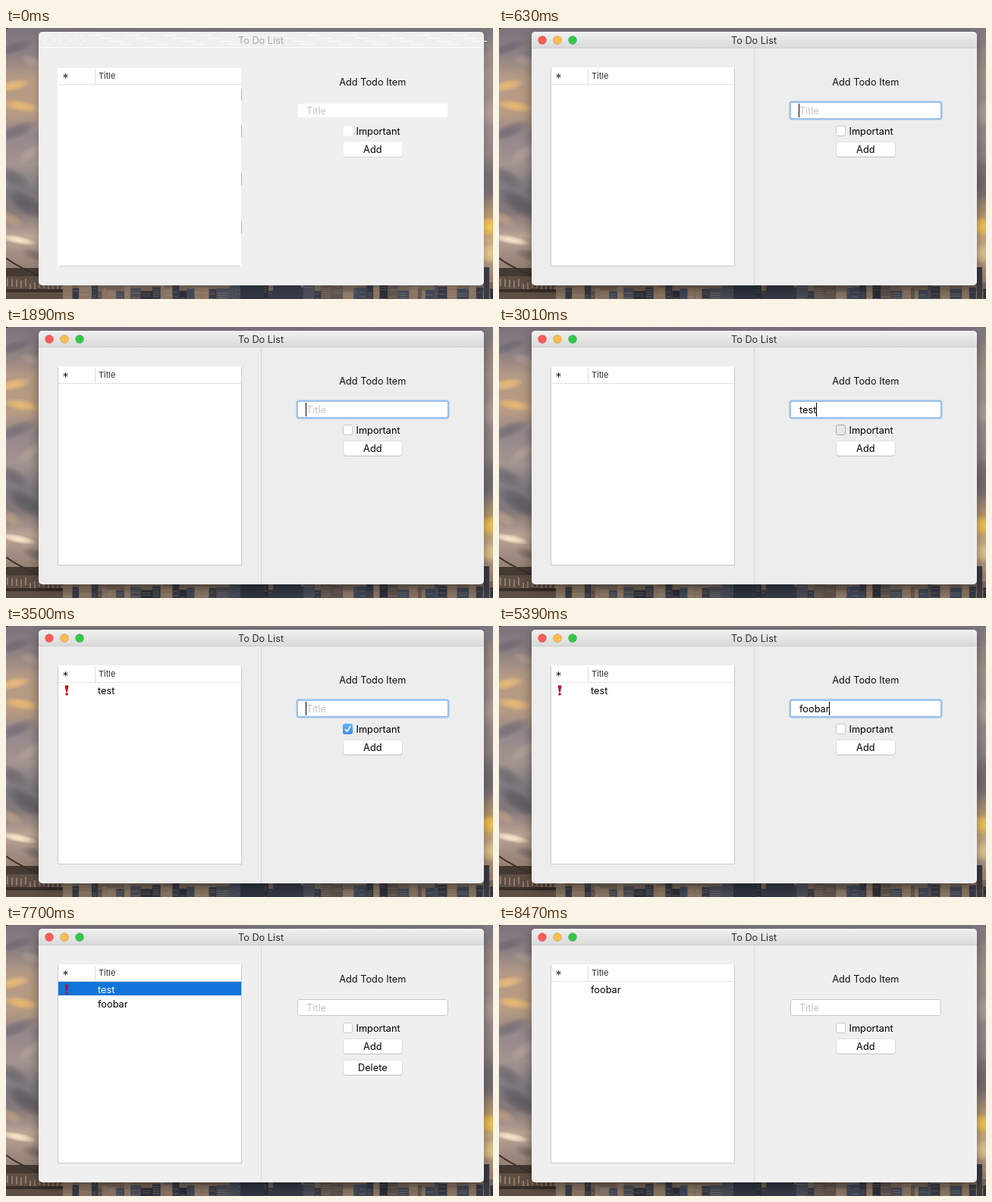
Recreate the animation shown at these times as an HTML page with a canvas. Size 642 by 358 pixels, loop 8.54 s.

```html
<!DOCTYPE html>
<html lang="en">
<head>
<meta charset="utf-8">
<title>To Do List</title>
<style>
html, body { margin: 0; width: 100%; height: 100%; overflow: hidden; background: #6b6672; }
canvas { display: block; }
</style>
</head>
<body>
<canvas id="stage" width="642" height="358"></canvas>
<script>
const W = 642, H = 358, LOOP = 8540, STEP = 70;
const ctx = document.getElementById('stage').getContext('2d');
const FONT = 'Inter, Roboto, sans-serif';
const SIZE = 12.75;

// Times of the user's actions, in ms
const AT = {
  awake: 70, check: 3080, add1: 3430, uncheck: 4060,
  add2: 5880, select: 6790, remove: 8120
};
const TYPING = [
  { word: 'test', start: 2100, gap: 140, end: AT.add1 },
  { word: 'foobar', start: 4480, gap: 140, end: AT.add2 }
];

const backdrop = makeBackdrop();

function seeded(seed) {
  return () => {
    seed = (seed * 16807) % 2147483647;
    return seed / 2147483647;
  };
}

function makeBackdrop() {
  const cv = document.createElement('canvas');
  cv.width = W;
  cv.height = H;
  const c = cv.getContext('2d');
  const rnd = seeded(77);

  const rect = (color, x, y, w, h) => {
    c.fillStyle = color;
    c.fillRect(x, y, w, h);
  };
  const sky = (x, w, stops) => {
    const g = c.createLinearGradient(0, 0, 0, H);
    for (const [y, color] of stops) g.addColorStop(y / H, color);
    rect(g, x, 0, w, H);
  };
  const cloud = (x, y, rx, ry, tilt, rgb, alpha) => {
    c.save();
    c.translate(x, y);
    c.rotate(tilt);
    c.scale(rx, ry);
    const g = c.createRadialGradient(0, 0, 0, 0, 0, 1);
    g.addColorStop(0, `rgba(${rgb},${alpha})`);
    g.addColorStop(.5, `rgba(${rgb},${alpha * .7})`);
    g.addColorStop(1, `rgba(${rgb},0)`);
    rect(g, -1, -1, 2, 2);
    c.restore();
  };

  sky(0, 320, [[0, '#7b737b'], [35, '#8d8183'], [65, '#b49a86'], [112, '#b89b82'],
    [140, '#94878a'], [180, '#a39490'], [215, '#7c787e'], [245, '#85797a'],
    [275, '#bba595'], [300, '#a08c80'], [330, '#8c7868']]);
  sky(320, 322, [[0, '#7c7680'], [60, '#a3938d'], [140, '#968a8b'], [220, '#85797a'],
    [262, '#d0a868'], [290, '#c4aa8e'], [330, '#9a8370']]);

  // Cloud banks, lit from the left
  cloud(12, 26, 26, 8, -.3, '104,99,110', .7);
  cloud(34, 44, 18, 8, .4, '176,158,150', .7);
  cloud(10, 76, 24, 8, -.2, '238,190,120', .9);
  cloud(20, 103, 26, 8, .15, '238,188,112', .9);
  cloud(14, 136, 30, 10, -.4, '112,106,116', .8);
  cloud(32, 166, 22, 9, -.6, '184,166,156', .7);
  cloud(10, 198, 26, 12, .5, '100,98,106', .7);
  cloud(26, 232, 30, 14, .6, '82,82,92', .75);
  cloud(6, 252, 18, 9, .5, '196,164,132', .7);
  cloud(16, 280, 26, 6, .2, '255,236,206', .95);
  cloud(38, 300, 18, 8, .3, '112,100,98', .7);
  cloud(638, 40, 14, 22, 0, '158,140,130', .6);
  cloud(638, 112, 14, 20, 0, '188,170,160', .6);
  cloud(638, 200, 16, 30, 0, '100,96,104', .6);
  cloud(637, 262, 16, 13, 0, '246,200,84', .95);
  cloud(638, 298, 14, 14, 0, '240,208,140', .8);

  // Bridge at the lower left
  rect('#5e4f45', 0, 326, 75, 32);
  rect('#453933', 0, 317, 46, 11);
  for (let x = 1; x < 74; x += 6) rect('#907a68', x, 331 + rnd() * 8, 2, 10);
  rect('#382e2a', 0, 345, 75, 4);
  c.strokeStyle = '#3a302b';
  c.lineWidth = 2;
  c.beginPath();
  c.moveTo(0, 304);
  c.quadraticCurveTo(30, 326, 110, 352);
  c.stroke();

  // Skyline along the lower edge
  rect('#75665a', 75, 336, W - 75, 22);
  const tones = ['#363a45', '#4a4d57', '#2c2f39', '#5f544e', '#8a7563', '#3f4958'];
  for (let x = 75; x < W;) {
    const w = 4 + rnd() * 13;
    const top = 336 + rnd() * 12;
    rect(tones[Math.floor(rnd() * tones.length)], x, top, w, H - top);
    for (let y = top + 3; y < H; y += 3) {
      if (rnd() > .55) rect('rgba(190,158,126,.35)', x + 1, y, w - 3, 1);
    }
    x += w;
  }
  rect('#303541', 309, 334, 31, 24);
  rect('#353a46', 353, 336, 36, 22);
  rect('#3b3b44', 630, 316, 7, 42);
  rect('#1d1b20', 0, 0, 2, 1);
  return cv;
}

function fill(color, x, y, w, h) {
  ctx.fillStyle = color;
  ctx.fillRect(x, y, w, h);
}

function round(x, y, w, h, r, color, line) {
  ctx.beginPath();
  ctx.roundRect(x, y, w, h, r);
  if (color) {
    ctx.fillStyle = color;
    ctx.fill();
  }
  if (line) {
    ctx.strokeStyle = line;
    ctx.lineWidth = 1;
    ctx.stroke();
  }
}

function text(str, x, y, color = '#000', size = SIZE, align = 'left') {
  ctx.font = `${size}px ${FONT}`;
  ctx.textAlign = align;
  ctx.fillStyle = color;
  ctx.fillText(str, x, y);
}

function vertical(y0, y1, from, to) {
  const g = ctx.createLinearGradient(0, y0, 0, y1);
  g.addColorStop(0, from);
  g.addColorStop(1, to);
  return g;
}

function stateAt(t) {
  const s = {
    awake: t >= AT.awake,
    focus: t >= AT.awake && t < AT.select,
    checked: t >= AT.check && t < AT.uncheck,
    boxDown: [AT.check, AT.uncheck].some(e => t >= e - 140 && t < e),
    addDown: [AT.add1, AT.add2].some(e => t >= e - 140 && t < e),
    deleteDown: t >= AT.remove - 140 && t < AT.remove,
    selected: t >= AT.select && t < AT.remove,
    typed: '', lastKey: 400, rows: []
  };
  for (const { word, start, gap, end } of TYPING) {
    if (t >= end) s.lastKey = end;
    else if (t >= start) {
      const n = Math.min(word.length, Math.floor((t - start) / gap) + 1);
      s.typed = word.slice(0, n);
      s.lastKey = start + (n - 1) * gap;
    }
  }
  if (t >= AT.add1 && t < AT.remove) s.rows.push({ title: 'test', urgent: true });
  if (t >= AT.add2) s.rows.push({ title: 'foobar' });
  s.caret = s.focus && (t - s.lastKey) % 1060 < 530;
  return s;
}

function drawWindow(s) {
  ctx.save();
  ctx.shadowColor = `rgba(0,0,0,${s.awake ? .4 : .2})`;
  ctx.shadowBlur = s.awake ? 16 : 8;
  ctx.shadowOffsetY = s.awake ? 6 : 2;
  round(43, 5, 587, 335, 5, s.focus ? '#ededed' : '#efefef');
  ctx.restore();

  if (!s.awake) {
    ctx.save();
    ctx.setLineDash([5, 3]);
    for (const x of [57, 77, 97]) round(x - 6.5, 9.5, 13, 13, 6.5, null, '#fff');
    ctx.restore();
    for (let row = 0; row < 4; row++) {
      for (let x = 110 + row * 13; x < 620; x += 48) fill('#fff', x, 9 + row * 4, 18, 1);
    }
    fill('#fff', 44, 25, 585, 1);
    text('To Do List', 336, 21, '#aaa', SIZE, 'center');
    return;
  }
  round(43, 5, 587, 21, [5, 5, 0, 0], vertical(5, 26, '#f0f0f0', '#dadada'));
  fill('#f8f8f8', 47, 5, 579, 1);
  fill('#cdcdcd', 43, 26, 587, 1);
  fill('#d6d6d6', 336, 27, 1, 313);
  ['#fc5b57', '#fcbd4e', '#34c84a'].forEach((color, i) => {
    round(51.5 + i * 20, 10.5, 11, 11, 5.5, color, 'rgba(0,0,0,.13)');
  });
  text('To Do List', 336, 21, '#2c2c2c', SIZE, 'center');
}

function drawMark(x, y, color) {
  ctx.fillStyle = color;
  ctx.beginPath();
  ctx.moveTo(x - 2.4, y);
  ctx.quadraticCurveTo(x, y - 1.4, x + 2.4, y);
  ctx.lineTo(x + .9, y + 8.5);
  ctx.lineTo(x - .9, y + 8.5);
  ctx.fill();
  ctx.beginPath();
  ctx.arc(x, y + 11, 1.8, 0, 7);
  ctx.fill();
}

function drawTable(s) {
  if (s.awake) {
    fill('#cacaca', 68, 53, 243, 262);
    fill('#fff', 69, 52, 241, 262);
  } else {
    round(68, 53, 242, 262, 2, '#fff');
    for (const y of [80, 128, 192, 256]) fill('#b5b5b5', 310, y, 1, 16);
    fill('#cfcfcf', 70, 314, 239, 1);
  }
  fill('#e2e2e2', 69, 74, 241, 1);
  fill('#dcdcdc', 117, 54, 1, 20);
  text('*', 74.5, 71.5, '#333', 16);
  text('Title', 122, 67, '#2c2c2c', 11);

  s.rows.forEach((row, i) => {
    const y = 75 + i * 19;
    const active = s.selected && i === 0;
    if (active) fill('#1174d9', 69, y, 241, 18);
    if (row.urgent) drawMark(80, y + 4, active ? '#a51648' : '#c3101a');
    text(row.title, 121, y + 15, active ? '#fff' : '#000');
  });
}

function drawField(s) {
  if (!s.awake) {
    fill('#fff', 385, 100, 197, 18);
  } else if (s.focus) {
    round(382, 96, 203, 26, 4.5, '#bdd5f0');
    round(383, 97, 201, 24, 3.5, '#9ac1ec');
    round(385, 99, 197, 20, 1.5, '#fff');
  } else {
    round(384.5, 98.5, 198, 21, 3, '#fff', '#c6c6c6');
  }
  text(s.typed || 'Title', 396, 114, s.typed ? '#000' : '#c3c3c3');
  if (s.caret) {
    const end = s.typed ? ctx.measureText(s.typed).width : -1;
    fill('#000', Math.floor(396 + end), 100, 1, 18);
  }
}

function drawCheckbox(s) {
  const line = s.boxDown ? '#a9a9a9' : '#c8c8c8';
  round(444.5, 129.5, 12, 13, 2.5, s.boxDown ? '#e9e9e9' : '#fff', s.awake && line);
  if (s.checked) {
    round(444, 129, 13, 14, 3, vertical(129, 143, '#65aff2', '#3a8ee9'));
    ctx.strokeStyle = '#fff';
    ctx.lineWidth = 1.7;
    ctx.lineCap = ctx.lineJoin = 'round';
    ctx.beginPath();
    ctx.moveTo(447.3, 136.6);
    ctx.lineTo(449.7, 139.4);
    ctx.lineTo(453.8, 132.6);
    ctx.stroke();
  }
  text('Important', 461.5, 141);
}

function drawButton(label, y, down, awake) {
  round(444.5, y + 1, 78, 20, 4, awake ? '#cdcdcd' : '#d6d6d6');
  const face = down ? vertical(y, y + 20, '#6aabf3', '#1a74e4') : '#fff';
  round(444.5, y + .5, 78, 19.5, 4, face, awake && 'rgba(0,0,0,.08)');
  text(label, 483.3, y + 15, down ? '#fff' : '#000', SIZE, 'center');
}

function draw(t) {
  const s = stateAt(t);
  ctx.drawImage(backdrop, 0, 0);
  drawWindow(s);
  drawTable(s);
  text('Add Todo Item', 483.3, 76, '#111', SIZE, 'center');
  drawField(s);
  drawCheckbox(s);
  drawButton('Add', 150, s.addDown, s.awake);
  if (s.selected) drawButton('Delete', 178, s.deleteDown, true);
}

const began = performance.now();
function tick() {
  const t = Math.max(0, performance.now() - began) % LOOP;
  draw(Math.floor(t / STEP) * STEP);
  requestAnimationFrame(tick);
}
tick();
</script>
</body>
</html>
```
